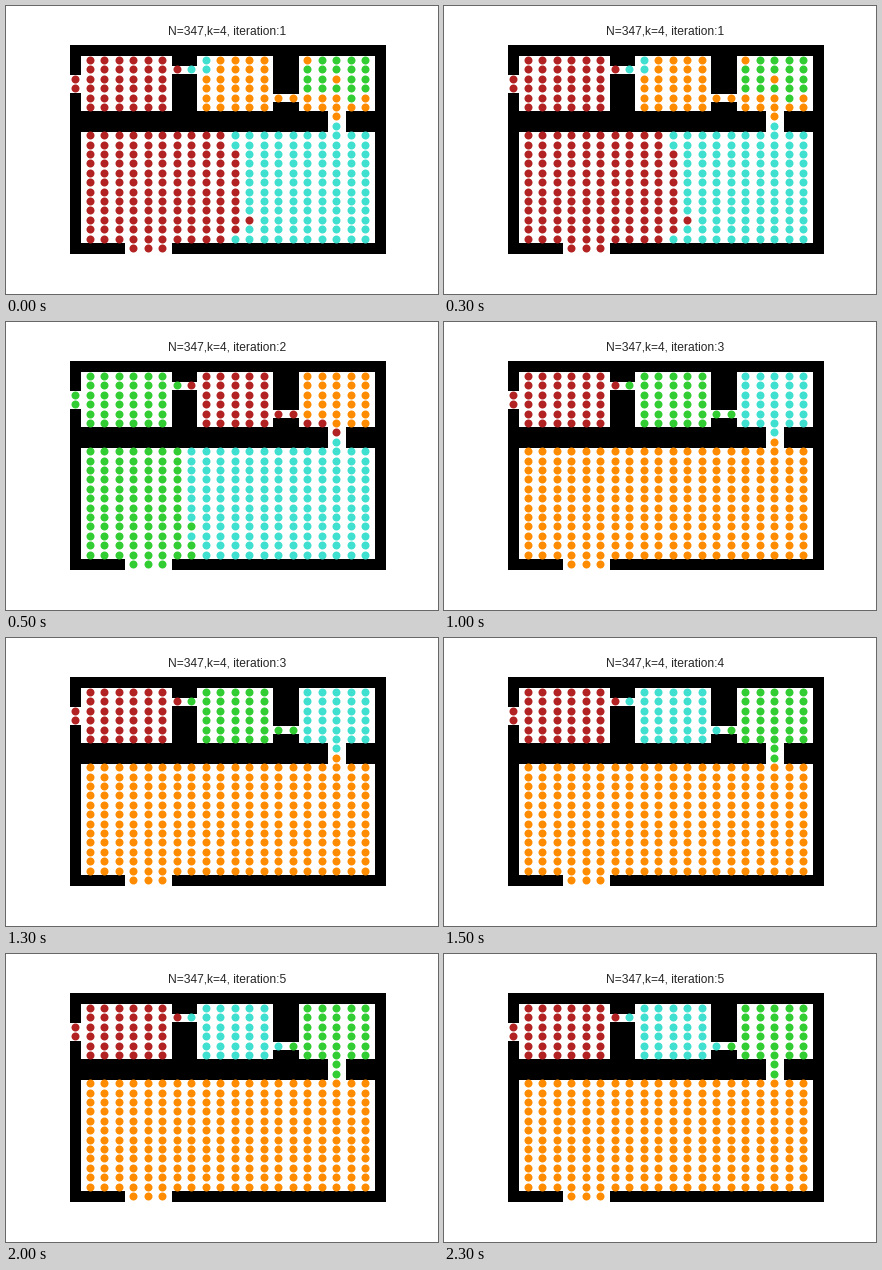
Animation, 432 px wide and 288 px high, one loop 2500 ms. Source, as a matplotlib script:

```python
import matplotlib.pyplot as plt
from matplotlib.animation import FuncAnimation
from matplotlib.patches import Rectangle

W, H = 432, 288
RED, CYAN, ORANGE, GREEN = "firebrick", "turquoise", "darkorange", "limegreen"
plt.rcParams["font.family"] = "Liberation Sans"

# Plot area in pixels; the floor plan has 22 x 22 cells inside 5 % margins
LEFT, RIGHT, TOP, BOTTOM = 0.125 * W, 0.9 * W, 0.12 * H, 0.875 * H
STEP_X = (RIGHT - LEFT) / 1.1 / 21
STEP_Y = (BOTTOM - TOP) / 1.1 / 21

# Free areas as pixel boxes: left, top, right, bottom
FREE = [
    (75, 50, 166, 105), (191, 50, 267, 105), (293, 50, 369, 105),
    (75, 126, 369, 237), (64, 69, 75, 87), (166, 60, 191, 68),
    (267, 88, 293, 96), (322, 105, 340, 126), (119, 237, 166, 248),
]


def block(cols, rows):
    return [(c, r) for c in cols for r in rows]


# Grid cells (column, row) of every part of the floor plan
ROOM_A = block(range(6), range(6)) + [(-1, 2), (-1, 3), (6, 1)]
ROOM_B = block(range(8, 13), range(6)) + [(7, 1), (13, 4)]
ROOM_C = block(range(15, 20), range(6)) + [(14, 4), (17, 6)]
HALL = block(range(20), range(8, 20)) + [(3, 20), (4, 20), (5, 20), (17, 7)]
CELLS = ROOM_A + ROOM_B + ROOM_C + HALL


def paint(a, b, c, hall):
    colors = {}
    for part, color in zip((ROOM_A, ROOM_B, ROOM_C, HALL), (a, b, c, hall)):
        colors.update(dict.fromkeys(part, color))
    return colors


def split_hall(colors, left, edge):
    """Colour the hall's left side up to edge(row) columns."""
    for c, r in HALL:
        if r >= 8 and c < edge(r):
            colors[c, r] = left


def first_step():
    colors = paint(RED, ORANGE, ORANGE, CYAN)
    colors.update(dict.fromkeys([(7, 1), (8, 0), (8, 1)], CYAN))
    greens = ["-GGGG", "GGGGG", "GG-GG", "GGGGG", "---G-"]
    for r, line in enumerate(greens):
        for c, mark in enumerate(line, 15):
            if mark == "G":
                colors[c, r] = GREEN
    split_hall(colors, RED, lambda r: 12 if r == 17 else 10 if r in (8, 9, 19) else 11)
    return colors


def second_step():
    colors = paint(GREEN, RED, ORANGE, CYAN)
    colors.update(dict.fromkeys([(14, 4), (15, 5), (16, 5), (17, 6)], RED))
    split_hall(colors, GREEN, lambda r: 8 if r in (16, 18, 19) else 7)
    return colors


def third_step():
    colors = paint(RED, GREEN, CYAN, ORANGE)
    colors[14, 4] = GREEN
    return colors


def final_step():
    colors = paint(RED, CYAN, GREEN, ORANGE)
    colors[17, 7] = GREEN
    return colors


STEPS = [first_step(), second_step(), third_step(), final_step(), final_step()]

fig = plt.figure(figsize=(W / 72, H / 72), dpi=72, facecolor="white")
ax = fig.add_axes([0, 0, 1, 1])
ax.set(xlim=(0, W), ylim=(H, 0))
ax.axis("off")


def box(x0, y0, x1, y1, color):
    ax.add_patch(Rectangle((x0, y0), x1 - x0, y1 - y0, color=color, lw=0))


box(64, 39, 380, 248, "black")
for area in FREE:
    box(*area, "white")

dots = {color: ax.scatter([], [], s=64, c=color, lw=0)
        for color in (RED, CYAN, ORANGE, GREEN)}
title = ax.text((LEFT + RIGHT) / 2, TOP - 6, "", size=12, color="#262626",
                ha="center", va="baseline")


def position(cell):
    c, r = cell
    return LEFT + STEP_X * (c + 2.05), TOP + STEP_Y * (r + 2.05)


def update(i):
    for color, group in dots.items():
        group.set_offsets([position(p) for p in CELLS if STEPS[i][p] == color])
    title.set_text(f"N={len(CELLS)},k=4, iteration:{i + 1}")
    return [*dots.values(), title]


anim = FuncAnimation(fig, update, frames=len(STEPS), interval=500, repeat=True)
plt.show()
```
